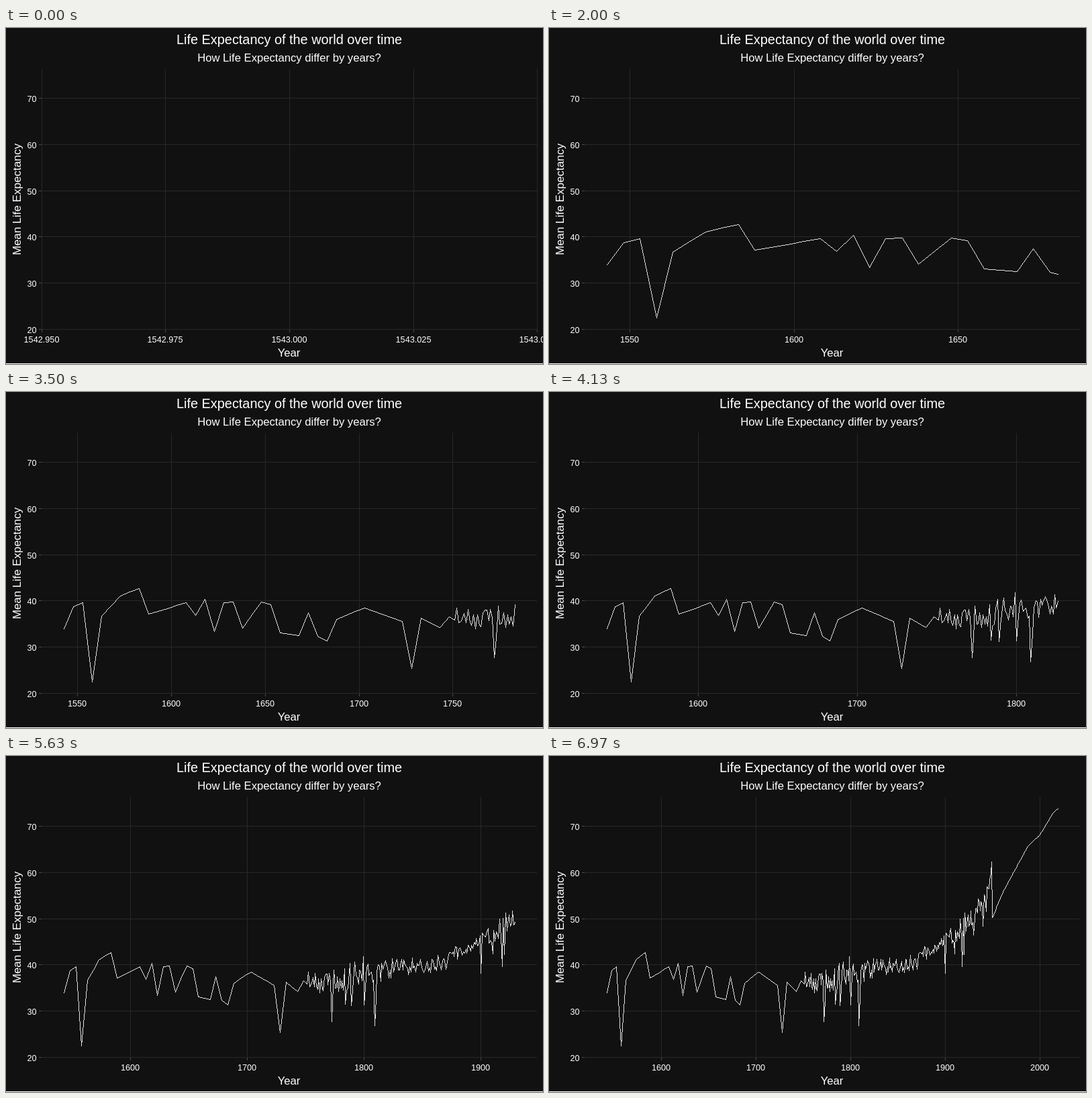
These frames come from a looping animation (800 by 500 pixels, 10 s). An HTML page with a canvas:

```html
<!DOCTYPE html>
<html lang="en">
<head>
<meta charset="utf-8">
<title>Life Expectancy</title>
<style>
  html, body { margin: 0; width: 100%; height: 100%; overflow: hidden; background: #111; }
  svg, canvas { position: absolute; left: 0; top: 0; width: 800px; height: 500px; overflow: hidden; }
  text { font: 12.7px "Liberation Sans", Arial, sans-serif; fill: #fff; text-anchor: middle; }
  text.label { font-size: 16.67px; }
  text.side { font-size: 16.9px; }
  text.title { font-size: 19.9px; }
  .yAxis text { text-anchor: end; }
  path { fill: none; shape-rendering: crispEdges; stroke-width: 1; }
  .grid { stroke: #282828; }
  .tick { stroke: #4a4a4a; }
</style>
</head>
<body>
<svg viewBox="0 0 800 500">
  <rect width="800" height="499" fill="#111"/>
  <rect y="499" width="800" height="1" fill="#fff"/>
  <text class="title" x="422" y="24">Life Expectancy of the world over time</text>
  <text class="label" x="422" y="50">How Life Expectancy differ by years?</text>
  <text class="label" x="421.5" y="489">Year</text>
  <text class="side" transform="translate(22 255) rotate(-90)">Mean Life Expectancy</text>
  <g id="yAxis" class="yAxis"></g>
  <g id="xAxis"></g>
</svg>
<canvas id="line" width="800" height="500"></canvas>
<script>
const LOOP = 10000, LAST_FRAME = 209;
const FIRST_YEAR = 1543, LAST_YEAR = 2019;
const PANEL = { left: 53.2, width: 738.6, top: 61, bottom: 449 };

// Turning points of the sparse early record.
const early = [[1543, 33.9], [1548, 38.8], [1553, 39.6], [1558, 22.4], [1563, 36.7],
  [1573, 41.1], [1583, 42.7], [1588, 37.1], [1608, 39.6], [1613, 36.8], [1618, 40.3],
  [1623, 33.4], [1628, 39.6], [1633, 39.8], [1638, 34.1], [1648, 39.8], [1653, 39.2],
  [1658, 33], [1668, 32.5], [1673, 37.4], [1678, 32.4], [1683, 31.3], [1688, 36],
  [1703, 38.5], [1723, 35.5], [1728, 25.3], [1733, 36.3], [1743, 34.3], [1748, 36.5]];
// Trend of the noisy yearly record and its worst years.
const trend = [[1751, 37], [1770, 36], [1795, 38.8], [1825, 39.3], [1870, 40.7],
  [1900, 45.5], [1925, 50], [1945, 54.5], [1949, 62]];
const crises = { 1772: 27.7, 1784: 31.5, 1789: 31.1, 1800: 31.3, 1809: 26.8,
  1900: 38.2, 1910: 42.4, 1918: 39.6, 1920: 42.2, 1930: 46.5, 1940: 48.4 };
const modern = [[1950, 50.3], [1960, 55.4], [1987, 65.6], [2000, 68.2], [2014, 72.9], [2019, 73.8]];

function interpolate(knots, x) {
  const i = Math.max(1, knots.findIndex(k => k[0] >= x));
  const [x0, y0] = knots[i - 1], [x1, y1] = knots[i];
  return y0 + (y1 - y0) * (x - x0) / (x1 - x0);
}

// Repeatable noise from -1 to 1.
function noise(seed) {
  const v = Math.sin(seed * 12.9898) * 43758.5453;
  return 2 * (v - Math.floor(v)) - 1;
}

function yearlyValue(year) {
  if (crises[year]) return crises[year];
  const base = interpolate(trend, year);
  const before = crises[year - 1];
  if (before && year < 1900) return base + (before - base) * 0.5;
  const swing = year < 1815 ? 3 : year < 1880 ? 2.2 : year < 1905 ? 1.2 : year < 1946 ? 2.6 : 0.4;
  return base + swing * noise(year);
}

const points = [];
for (let y = FIRST_YEAR; y <= 1748; y += 5) points.push([y, interpolate(early, y)]);
for (let y = 1751; y < 1950; y++) points.push([y, yearlyValue(y)]);
for (let y = 1950; y <= LAST_YEAR; y++) points.push([y, interpolate(modern, y)]);

const frameOf = year => Math.round(LAST_FRAME * (year - FIRST_YEAR) / (LAST_YEAR - FIRST_YEAR));
const yPixel = value => 448.3 - (value - 20) * 6.874;
const crisp = v => Math.floor(v) + 0.5;
const byId = id => document.getElementById(id);
const pen = byId("line").getContext("2d");
pen.fillStyle = "#e0e0e0";

// Points reached by a frame; a gap between two points is drawn part way.
function revealed(frame) {
  const next = points.findIndex(p => frameOf(p[0]) > frame);
  if (next < 0) return points;
  const shown = points.slice(0, next);
  const a = points[next - 1], b = points[next];
  const start = frameOf(a[0]);
  const f = (frame - start) / (frameOf(b[0]) - start);
  if (f > 0) shown.push([a[0] + (b[0] - a[0]) * f, a[1] + (b[1] - a[1]) * f]);
  return shown;
}

// Axis breaks by the extended Wilkinson labelling rule.
function axisBreaks(lo, hi, wanted = 5) {
  const Q = [1, 5, 2, 2.5, 4, 3], range = hi - lo;
  const total = (s, c, d) => 0.25 * s + 0.2 * c + 0.5 * d + 0.05;
  let best = { score: -2 };
  for (let j = 1; ; j++) {
    for (let i = 0; i < Q.length; i++) {
      const simple = 1 - i / 5 - j;
      if (total(simple + 1, 1, 1) < best.score) return listBreaks(best, lo, hi);
      for (let k = 2; ; k++) {
        const maxDensity = k >= wanted ? 2 - (k - 1) / (wanted - 1) : 1;
        if (total(simple + 1, 1, maxDensity) < best.score) break;
        for (let z = Math.ceil(Math.log10(range / (k + 1) / j / Q[i])); ; z++) {
          const step = j * Q[i] * 10 ** z, span = step * (k - 1);
          const excess = Math.max(0, (span - range) / 2);
          const maxCover = 1 - (excess / (0.1 * range)) ** 2;
          if (total(simple + 1, maxCover, maxDensity) < best.score) break;
          const from = Math.floor(hi / step) * j - (k - 1) * j;
          const to = Math.ceil(lo / step) * j;
          for (let s = from; s <= to; s++) {
            const min = s * step / j, max = min + span;
            const cover = 1 - 0.5 * ((hi - max) ** 2 + (lo - min) ** 2) / (0.1 * range) ** 2;
            const ratio = (k - 1) / span * (Math.max(max, hi) - Math.min(min, lo)) / (wanted - 1);
            const score = total(simple, cover, 2 - Math.max(ratio, 1 / ratio));
            if (score > best.score) best = { score, min, step, count: k };
          }
        }
      }
    }
  }
}

function listBreaks({ min, step, count }, lo, hi) {
  const eps = step * 1e-6;
  return Array.from({ length: count }, (_, i) => min + i * step)
    .filter(b => b > lo - eps && b < hi + eps);
}

function formatAll(values) {
  let digits = 0;
  while (digits < 3 && values.some(v => Math.abs(v - v.toFixed(digits)) > 1e-6)) digits++;
  return values.map(v => v.toFixed(digits));
}

function drawYAxis() {
  byId("yAxis").innerHTML = [20, 30, 40, 50, 60, 70].map(v => {
    const y = crisp(yPixel(v));
    return `<path class="grid" d="M53 ${y}H791"/><path class="tick" d="M49 ${y}H53"/>` +
      `<text x="45.5" y="${y + 5.5}">${v}</text>`;
  }).join("");
}

// Aliased one-pixel segment.
function drawSegment([x0, y0], [x1, y1]) {
  const steps = Math.max(Math.abs(x1 - x0), Math.abs(y1 - y0), 1);
  for (let i = 0; i <= steps; i++) {
    pen.fillRect(Math.round(x0 + (x1 - x0) * i / steps), Math.round(y0 + (y1 - y0) * i / steps), 1, 1);
  }
}

function draw(frame) {
  const shown = revealed(frame);
  const span = shown[shown.length - 1][0] - FIRST_YEAR;
  const pad = span ? span * 0.05 : 0.05;
  const lo = FIRST_YEAR - pad, hi = FIRST_YEAR + span + pad;
  const xPixel = year => PANEL.left + PANEL.width * (year - lo) / (hi - lo);

  const breaks = axisBreaks(lo, hi), labels = formatAll(breaks);
  byId("xAxis").innerHTML = breaks.map((b, i) => {
    const x = crisp(xPixel(b));
    return `<path class="grid" d="M${x} ${PANEL.top}V${PANEL.bottom}"/>` +
      `<path class="tick" d="M${x} ${PANEL.bottom}v4"/>` +
      `<text x="${x - 0.5}" y="468">${labels[i]}</text>`;
  }).join("");

  pen.clearRect(0, 0, 800, 500);
  const pixels = shown.map(([year, v]) => [Math.floor(xPixel(year)), Math.floor(yPixel(v))]);
  for (let i = 1; i < pixels.length; i++) drawSegment(pixels[i - 1], pixels[i]);
}

let current = -1;
const startTime = performance.now();
function tick() {
  const t = (performance.now() - startTime) % LOOP;
  // Frames last 100/3 ms, snapped to hundredths of a second.
  const frame = Math.min(LAST_FRAME, Math.floor((Math.floor(t / 10) * 10 + 5) * 0.03));
  if (frame !== current) draw(current = frame);
  requestAnimationFrame(tick);
}

drawYAxis();
tick();
</script>
</body>
</html>
```
